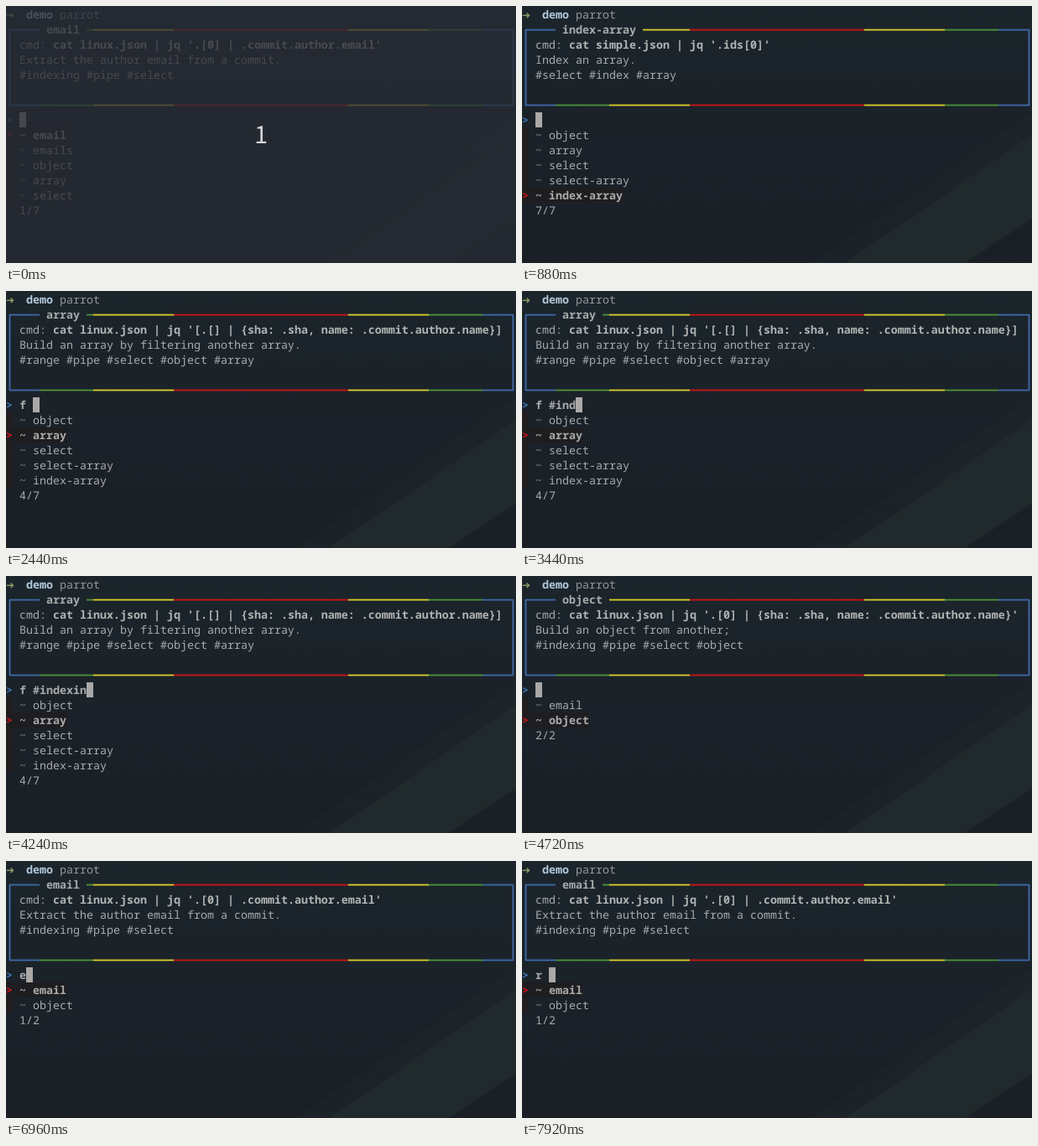
An HTML page that plays this animation: 608 px wide and 307 px high, repeating every 8000 ms.

```html
<!DOCTYPE html>
<html lang="en">
<head>
<meta charset="utf-8">
<title>parrot demo</title>
<style>
html, body { margin: 0; width: 100%; height: 100%; overflow: hidden; background: #1b2229; }
svg { display: block; width: 608px; height: 307px; }
text {
  font-family: "Noto Sans Mono", "Liberation Mono", monospace;
  font-size: 13.3333px;
  font-variant-ligatures: none;
  text-rendering: geometricPrecision;
  white-space: pre;
}
.b { font-weight: 700; }
.arrow { font: 12px "DejaVu Sans", sans-serif; fill: #909d68; }
.digit { font: 29px "Noto Sans CJK JP", "DejaVu Sans", sans-serif; fill: #d4d6d8; text-anchor: middle; }
</style>
</head>
<body>
<svg viewBox="0 0 608 307">
  <defs>
    <linearGradient id="bg" x1="0" y1="0" x2="0" y2="1">
      <stop offset="0" stop-color="#1b252b"/>
      <stop offset=".5" stop-color="#1b2229"/>
      <stop offset="1" stop-color="#1a1f26"/>
    </linearGradient>
  </defs>
  <rect width="608" height="307" fill="url(#bg)"/>
  <path d="M345 307L608 128V254L528 307Z" fill="#222b2d" opacity=".3"/>
  <path d="M385 307L608 154V254L528 307Z" fill="#222b2d" opacity=".75"/>
  <g id="screen"></g>
  <g id="veil">
    <rect width="608" height="307" fill="#282c35" opacity=".77"/>
    <text class="digit" x="304" y="164">1</text>
  </g>
</svg>
<script>
const LOOP = 8000, CELL = 8, ROW = 18, TOP = 1, LINE = 1.8;
const GREY = '#a9abab', BLUE = '#406aa8', GREEN = '#4e9438', YELLOW = '#dccf2c', RED = '#cc1414';
const screen = document.getElementById('screen');
const veil = document.getElementById('veil');

const items = {
  email: ["cat linux.json | jq '.[0] | .commit.author.email'", 'Extract the author email from a commit.', '#indexing #pipe #select'],
  emails: ["cat linux.json | jq '.[].commit.author.email'", 'Extract the author emails.', '#range #select'],
  object: ["cat linux.json | jq '.[0] | {sha: .sha, name: .commit.author.name}'", 'Build an object from another;', '#indexing #pipe #select #object'],
  array: ["cat linux.json | jq '[.[] | {sha: .sha, name: .commit.author.name}]", 'Build an array by filtering another array.', '#range #pipe #select #object #array'],
  select: ["cat simple.json | jq '.id'", 'Select a value.', '#select'],
  'select-array': ["cat simple.json | jq '.ids'", 'Select an array.', '#select #array'],
  'index-array': ["cat simple.json | jq '.ids[0]'", 'Index an array.', '#select #index #array']
};
const all = Object.keys(items), indexed = ['email', 'object'];

// Each event: time, then the parts of the state that change.
const events = [
  [0, { list: all, first: 0, sel: 0, query: '' }],
  [880, { first: 2, sel: 6 }],
  [1240, { sel: 5 }],
  [1400, { sel: 4 }],
  [1600, { sel: 3 }],
  ...typing('f #indexing', [2360, 2440, 2840, 3160, 3320, 3440, 3640, 4000, 4080, 4240, 4360]),
  [4720, { list: indexed, first: 0, sel: 1, query: '' }],
  [5720, { sel: 0 }],
  [6000, { sel: 1 }],
  [6280, { sel: 0 }],
  [6960, { query: 'e' }],
  [7480, { query: '' }],
  ...typing('r ', [7640, 7920])
];

function typing(str, times) {
  return times.map((t, i) => [t, { query: str.slice(0, i + 1) }]);
}

function add(tag, attrs, str) {
  const el = document.createElementNS('http://www.w3.org/2000/svg', tag);
  for (const k in attrs) el.setAttribute(k, attrs[k]);
  if (str) el.textContent = str;
  screen.append(el);
}

const y = row => TOP + row * ROW;

function write(col, row, str, fill = GREY, bold = true) {
  add('text', { x: col * CELL, y: y(row) + 14, fill, class: bold ? 'b' : '' }, str);
}

function block(col, row, w, h, fill) {
  add('rect', { x: col * CELL, y: y(row), width: w * CELL, height: h * ROW, fill });
}

function rule(row, gapFrom, gapTo) {
  const stops = [4, 40, 104, 200, 408, 504, 568, 605];
  const hues = [BLUE, GREEN, YELLOW, RED, YELLOW, GREEN, BLUE];
  const top = y(row) + 9.5 - LINE / 2;
  const piece = (a, b, fill) => b > a && add('rect', { x: a, y: top, width: b - a, height: LINE, fill });
  hues.forEach((hue, i) => {
    const [a, b] = [stops[i], stops[i + 1]];
    piece(a, Math.min(b, gapFrom), hue);
    piece(Math.max(a, gapTo), b, hue);
  });
}

function draw({ list, first, sel, query }) {
  screen.replaceChildren();
  const name = list[sel], [cmd, about, tags] = items[name];

  add('text', { x: 0, y: 15, class: 'arrow' }, '➜');
  write(3, 0, 'demo', '#b3c9dc');
  write(8, 0, 'parrot', '#92989c', false);

  rule(1, 40, (name.length + 7) * CELL);
  rule(6, 608, 608);
  for (const x of [4.5, 604.5]) add('rect', { x: x - LINE / 2, y: 28, width: LINE, height: 91, fill: BLUE });
  write(6, 1, name);
  write(2, 2, 'cmd:', GREY, false);
  write(7, 2, cmd, '#b2b4b4');
  write(2, 3, about, GREY, false);
  write(2, 4, tags, GREY, false);

  write(0, 7, '>', '#3f78b8');
  write(2, 7, query);
  block(2 + query.length, 7, 1, 1, '#aaa9a8');

  const shown = list.slice(first, first + 5);
  block(0, 8, 1, shown.length, '#221d20');
  shown.forEach((item, i) => {
    const row = 8 + i, on = item === name;
    if (on) {
      block(0, row, item.length + 4, 1, '#1e1d20');
      write(0, row, '>', '#d81418');
    }
    write(2, row, '~', on ? GREY : '#75817f', on);
    write(4, row, item, GREY, on);
  });
  write(2, 8 + shown.length, `${sel + 1}/${list.length}`, GREY, false);
}

let start, last = -1;
function tick(now) {
  start ??= now;
  const t = (now - start) % LOOP;
  const n = events.findLastIndex(e => e[0] <= t);
  if (n !== last) draw(Object.assign({}, ...events.slice(0, n + 1).map(e => e[1])));
  last = n;
  veil.style.display = t < 40 ? '' : 'none';
  requestAnimationFrame(tick);
}

draw(events[0][1]);
requestAnimationFrame(tick);
</script>
</body>
</html>
```
